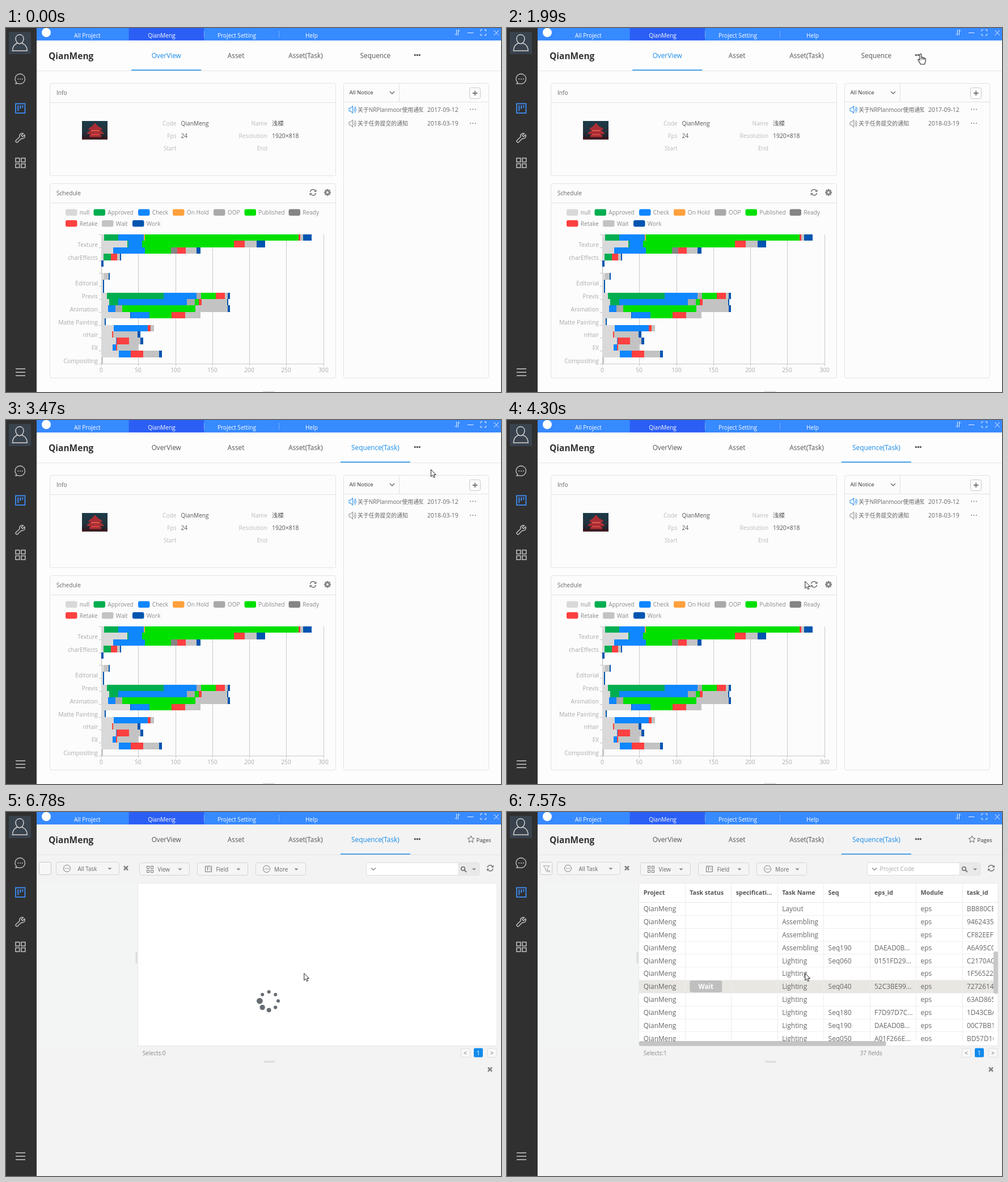
Recreate the animation shown at these times as an HTML page with a canvas. Size 873 by 642 pixels, loop 8000 ms.

```html
<!DOCTYPE html>
<html lang="en">
<head>
<meta charset="utf-8">
<title>Project overview</title>
<style>
html, body { margin: 0; width: 100%; height: 100%; overflow: hidden; background: #fdfdfd; }
canvas { display: block; }
</style>
</head>
<body>
<canvas id="stage" width="873" height="642"></canvas>
<script>
const g = document.getElementById('stage').getContext('2d');
const LOOP = 8000, TAU = Math.PI * 2;
const FONT = '"Open Sans", "Noto Sans CJK SC", "Noto Sans CJK", "Noto Sans", sans-serif';
const PROJECT = 'QianMeng', BLUE = '#188cea';

// ---- helpers ----
function text(s, x, y, color = '#555', size = 10.1, align = 'left', weight = 400) {
  g.font = `${weight} ${size}px ${FONT}`;
  g.textAlign = align;
  g.fillStyle = color;
  g.fillText(s, x, y + size * 0.36);
}
function rect(x, y, w, h, color) {
  g.fillStyle = color;
  g.fillRect(x, y, w, h);
}
function box(x, y, w, h, r, fill, stroke) {
  g.beginPath();
  g.roundRect(x, y, w, h, r);
  if (fill) { g.fillStyle = fill; g.fill(); }
  if (stroke) { g.strokeStyle = stroke; g.lineWidth = 1; g.stroke(); }
}
function dot(x, y, r, color) {
  g.fillStyle = color;
  g.beginPath();
  g.arc(x, y, r, 0, TAU);
  g.fill();
}
function dots(x, y, gap, r, color) {
  for (let i = -1; i < 2; i++) dot(x + i * gap, y, r, color);
}
function draw(d, color, width = 1, fill, x = 0, y = 0) {
  const p = new Path2D(d);
  g.save();
  g.translate(x, y);
  if (fill) { g.fillStyle = fill; g.fill(p); }
  if (color) { g.strokeStyle = color; g.lineWidth = width; g.stroke(p); }
  g.restore();
}
function ring(x, y, r, color, width = 1) {
  g.strokeStyle = color;
  g.lineWidth = width;
  g.beginPath();
  g.arc(x, y, r, 0, TAU);
  g.stroke();
}
function clipTo(x, y, w, h, paint) {
  g.save();
  g.beginPath();
  g.rect(x, y, w, h);
  g.clip();
  paint();
  g.restore();
}
const chevron = (x, y, color) => draw('M-4 -2L0 2L4 -2', color, 1.3, null, x, y);
const caret = (x, y) => draw('M-3.5 -1.5H3.5L0 2Z', null, 0, '#888', x, y);
const cross = (x, y) => draw('M-3.5 -3.5L3.5 3.5M3.5 -3.5L-3.5 3.5', '#858585', 2.6, null, x, y);
const refresh = (x, y) => {
  draw('M-5 -1A5 5 0 0 1 4 -3M5 1A5 5 0 0 1 -4 3', '#808080', 1.6, null, x, y);
  draw('M6 -5.5V-1H1.5ZM-6 5.5V1H-1.5Z', null, 0, '#808080', x, y);
};
function gear(x, y) {
  g.save();
  g.translate(x, y);
  for (let i = 0; i < 8; i++) {
    rect(-1.4, -6, 2.8, 4, '#858585');
    g.rotate(TAU / 8);
  }
  g.restore();
  ring(x, y, 3.3, '#858585', 2.6);
}

// ---- window frame ----
function sidebar() {
  rect(0, 0, 54, 642, '#303030');
  rect(5, 7, 39, 39, '#39434d');
  draw('M24 11.8C19.5 11.8 17 15 17 19C17 23.3 20 27.7 24 27.7C28 27.7 31 23.3 31 19C31 15 28.5 11.8 24 11.8Z' +
    'M20 26.8C14.5 28.8 11.5 33 11.5 40.3H37.3C37.3 33 33.5 28.8 28 26.8', '#d2d2d2', 1.5);
  const c = '#c4c4c4';
  draw('M18.7 96A8.7 8.7 0 1 1 22 98L17 98.3Z', c, 1.3);
  dots(25, 90, 3.8, 1, c);
  g.strokeStyle = '#3d8df2';
  g.lineWidth = 1.8;
  g.strokeRect(17, 133.5, 16.5, 16.5);
  for (const [x, h] of [[20.3, 10], [24.3, 6], [28.3, 4]]) rect(x, 136.5, 2, h, '#3d8df2');
  draw('M32.8 188.3L29.2 191.8L26.9 189.5L30.4 186C27 184.6 22.8 187.4 24 192L17.6 198.2C15.8 200.2 18.7 203 20.6 201.2L26.9 195C31.5 196.2 34.5 191.7 32.8 188.3Z', c, 1.4);
  g.strokeStyle = c;
  g.lineWidth = 1.5;
  for (const x of [17, 27]) for (const y of [229.5, 239.5]) g.strokeRect(x, y, 6.8, 6.8);
  for (const y of [600.5, 606.5, 612.5]) rect(17, y, 17, 1.4, '#d6d6d6');
}
function topBar() {
  rect(54, 0, 819, 22, '#378aff');
  rect(216.6, 0, 132.6, 21.6, '#2b5ef4');
  rect(349, 5, 1, 12, '#75acff');
  rect(481, 5, 1, 12, '#75acff');
  dot(71, 8, 8, '#fff');
  const c = '#fff';
  text('All Project', 143.5, 13, c, 10.1, 'center');
  text(PROJECT, 274.5, 13, c, 10.1, 'center');
  text('Project Setting', 407, 13, c, 10.1, 'center');
  text('Help', 539, 13, c, 10.1, 'center');
  draw('M794.5 3V13L791.5 10M797.5 13V3L800.5 6M814 8.5H824.5M837 6V3H840M843.5 3H846.5V6M846.5 10V13H843.5M840 13H837V10M860.5 4L869 13M869 4L860.5 13', '#e8f1ff');
}
function header(active, tabs) {
  text(PROJECT, 75, 49, '#333', 15.5, 'left', 700);
  tabs.forEach((s, i) => {
    const x = 282.7 + i * 122.9;
    text(s, x, 48.5, i === active ? BLUE : '#555', 11.8, 'center');
    if (i === active) rect(x - 61.5, 73.5, 123, 1.5, BLUE);
  });
  dots(725.3, 47.7, 4, 1.7, '#555');
}

// ---- overview page ----
const COLORS = {
  n: '#d9d9d9', a: '#00ae50', c: '#0f87ff', h: '#ffa03c', o: '#a9a9a9',
  p: '#00e000', d: '#848484', r: '#ff4040', w: '#c3c3c3', k: '#0055b0'
};
// each part: colour key and its right end
const BARS = [
  'n173 a198 c243 h245 p516 r519 w524 k539',
  'n214 a216 c240 p402 r421 w442 k457',
  'n189 c245 p291 d302 r317 w336 k343',
  'n172 a185 r196 w201 k203',
  'k172', '',
  'n173 w181 k183',
  'n171 k173', 'n171 k173',
  'n178 a278 c336 o344 p370 r386 w391 k395',
  'n182 a198 c319 o333 p340 r345 w390 k392',
  'n180 c193 o205 p334 w391 k395',
  'n219 k220 c253 p292 r316 w343',
  'n174 k176',
  'n190 c250 r255 w261',
  'n187 r189 w232 k237',
  'n194 c195 r217 w237 k242',
  'n188 c194 r196 w233',
  'n199 c220 r242 w270 k275',
  'w171'
];
const LEGEND = [
  ['n', 'null', 105, 0], ['a', 'Approved', 154.5, 0], ['c', 'Check', 233, 0], ['h', 'On Hold', 294, 0],
  ['o', 'OOP', 366, 0], ['p', 'Published', 420.5, 0], ['d', 'Ready', 498.5, 0],
  ['r', 'Retake', 105, 1], ['w', 'Wait', 169, 1], ['k', 'Work', 223, 1]
];
const GROUPS = ['Texture', 'charEffects', '', 'Editorial', 'Previs', 'Animation', 'Matte Painting', 'nHair', 'FX', 'Compositing'];

function chart() {
  for (const [key, name, x, row] of LEGEND) {
    const y = 325.5 + row * 19.5;
    box(x, y - 6, 20.5, 11.5, 3, COLORS[key]);
    text(name, x + 24.8, y, '#8a8a8a');
  }
  const top = 364, step = 11.4;
  for (let i = 0; i <= 6; i++) {
    const x = Math.round(168 + i * 65.25);
    rect(x, top, 1, 228, i ? '#c9c9c9' : '#b5b5b5');
    rect(x, 592, 1, 4, '#c9c9c9');
    text(i * 50, x, 603.5, '#aaa', 10.1, 'center');
  }
  rect(168, 592, 392, 1, '#c9c9c9');
  for (let i = 0; i <= 10; i++) rect(164, Math.round(top + i * step * 2), 4, 1, '#c0c0c0');
  GROUPS.forEach((s, i) => text(s, 162, 382 + i * step * 2, '#aaa', 10.3, 'right'));
  BARS.forEach((row, i) => {
    let x = 168;
    const y = Math.round(top + i * step), h = Math.round(top + (i + 1) * step) - y;
    for (const part of row.split(' ').filter(Boolean)) {
      const end = +part.slice(1);
      rect(x, y, end - x, h, COLORS[part[0]]);
      x = end;
    }
  });
}
function photo() {
  const sky = g.createLinearGradient(0, 164, 0, 196);
  sky.addColorStop(0, '#1c3b49');
  sky.addColorStop(0.6, '#24313c');
  sky.addColorStop(1, '#221a22');
  rect(134, 164, 45, 32.5, sky);
  draw('M146 177L152 173L157 167L162 173L169 177V180H146ZM143 185L148 181H167L172 185V187H143ZM147 188H168V193H147Z', null, 0, '#a92d34');
  rect(150, 180, 15, 2, '#e05a4c');
  rect(150, 187, 15, 2, '#d8473f');
  rect(134, 192.5, 45, 4, '#3a171e');
}
function speaker(y, color) {
  draw('M605 -2.5H607.5L611.5 -6V6L607.5 2.5H605ZM613.5 -3A4.5 4.5 0 0 1 613.5 3M614.8 -5.5A7.5 7.5 0 0 1 614.8 5.5', color, 1.1, null, 0, y);
}
function notice(y, title, date, color) {
  speaker(y, color);
  clipTo(618, y - 9, 118, 18, () => text(title, 620, y, '#666', 9.9));
  text(date, 743, y, '#666', 10.5);
  dots(823.5, y - 0.5, 4.3, 0.9, '#777');
}
function overview(active) {
  rect(54, 22, 819, 620, '#fdfdfd');
  rect(54, 75, 819, 1, '#e6e6e6');
  header(active, ['OverView', 'Asset', 'Asset(Task)', active ? 'Sequence(Task)' : 'Sequence']);
  const line = '#e2e2e2';
  box(77.5, 97.5, 504, 163, 3, '#fcfcfc', line);
  rect(78, 131, 503, 1, line);
  text('Info', 89, 114.5, '#666');
  photo();
  const info = [['Code', PROJECT, 'Name', '浅檬'], ['Fps', '24', 'Resolution', '1920×818'], ['Start', '', 'End', '']];
  info.forEach((r, i) => {
    const y = 168.5 + i * 22;
    text(r[0], 300.5, y, '#bbb', 10.2, 'right');
    text(r[1], 308.5, y, '#555', 10.2);
    text(r[2], 461, y, '#bbb', 10.2, 'right');
    text(r[3], 469, y, '#555', 10.4);
  });
  box(77.5, 274.5, 504, 343, 3, '#fcfcfc', line);
  rect(78, 308, 503, 1, line);
  text('Schedule', 89, 291.5, '#666');
  refresh(541.5, 290);
  gear(567, 290);
  chart();
  box(595.5, 97.5, 256, 520, 3, '#fcfcfc', line);
  rect(596, 130, 255, 1, line);
  rect(693, 98, 1, 32, line);
  text('All Notice', 605.5, 114, '#333', 9.6);
  chevron(681, 114, '#666');
  box(817.5, 105.5, 19, 19, 3, '#fcfcfc', '#c8c8c8');
  draw('M823 115H831.5M827.2 110.8V119.2', '#777', 1.8);
  notice(144, '关于NRPlanmoor使用通知', '2017-09-12', '#3a98ee');
  notice(168.5, '关于任务提交的通知', '2018-03-19', '#999');
  box(453, 640.5, 21, 4, 1, '#dedede');
}

// ---- drop-down ----
const MENU = ['Sequence(Task)', 'Shot', 'Shot(Task)', 'Version', 'poseLibrary', 'Online File'];
function menu(alpha, hover) {
  g.save();
  g.globalAlpha = alpha;
  g.shadowColor = 'rgba(0,0,0,.3)';
  g.shadowBlur = 4;
  g.shadowOffsetY = 1;
  box(705.5, 77, 87.5, 136.5, 2, '#f6f6f6');
  g.shadowColor = 'transparent';
  box(705.5, 77.5, 87, 136, 2, null, '#d8d8d8');
  if (hover) rect(706, 78, 86, 21, '#e6e4df');
  MENU.forEach((s, i) => text(s, 711.5, 88 + i * 22.8, '#999'));
  g.restore();
}

// ---- task page ----
function button(x, w, y, label, labelX) {
  box(x + 0.5, y + 0.5, w, 22, 3, '#f5f5f5', '#d5d5d5');
  text(label, labelX, y + 12.5, '#666', 9.9);
  caret(x + w - 16, y + 12);
}
function ringDots(x, y) {
  ring(x, y, 6, '#777');
  dots(x, y, 2.7, 0.8, '#777');
}
function taskPage(ready) {
  rect(54, 22, 819, 620, '#f3f3f3');
  rect(54, 75, 819, 1, '#e4e4e4');
  header(3, ['OverView', 'Asset', 'Asset(Task)', 'Sequence(Task)']);
  draw('M0 -6L1.8 -2L6 -1.6L2.8 1.2L3.8 5.5L0 3.2L-3.8 5.5L-2.8 1.2L-6 -1.6L-1.8 -2Z', '#666', 1, null, 820, 48);
  text('Pages', 829.5, 49.5, '#333', 9.5);

  box(58.5, 88.5, 21, 22, 2, '#f7f7f7', '#c6c6c6');
  if (ready) draw('M64 95H75L71 100V105L68 103V100ZM72 103.5H76M72 105.5H76', '#999', 1);
  button(88, 111, 88, 'All Task', 126.5);
  ringDots(107.5, 99.5);
  cross(211.5, 99);
  button(235, 88, 89, 'View', 267.5);
  g.strokeStyle = '#777';
  g.lineWidth = 1;
  for (const x of [248.5, 255.5]) for (const y of [95.5, 102.5]) g.strokeRect(x, y, 4, 4);
  button(337, 89, 89, 'Field', 370.5);
  draw('M351.5 95.5H362.5V105.5H351.5ZM353.5 98H357.5M355.5 98V103.5M359 99H361M359 102H361', '#777');
  button(440, 88, 89, 'More', 473);
  ringDots(459.5, 100.5);
  box(635.5, 89.5, 199, 22, 3, '#e9e9e9', '#e0e0e0');
  box(635.5, 89.5, 163, 22, [3, 0, 0, 3], '#fff', '#dedede');
  chevron(648, 100.5, '#888');
  if (ready) text('Project Code', 657.5, 100.5, '#aaa', 10.3);
  ring(806, 100, 3.2, '#777', 1.8);
  draw('M808.5 102.5L812 106', '#777', 2);
  caret(825.5, 101);
  refresh(854, 99);

  rect(54, 125, 178, 287, '#f3f5f4');
  rect(228.5, 247, 3, 20, '#dcdcdc');
  box(232.5, 125.5, 633.5, 287, 0, '#fff', '#e6e6e6');
  rect(455, 439, 19, 1, '#cfcfcf');
  rect(455, 441, 19, 1, '#cfcfcf');
  box(802.5, 417, 15.5, 15.5, 2, '#f8f8f8', '#dcdcdc');
  box(825, 416.5, 16, 16, 2, '#118aec');
  box(849.5, 417, 15.5, 15.5, 2, '#f8f8f8', '#dcdcdc');
  text('<', 810, 425, '#666', 10.1, 'center');
  text('1', 833, 425, '#fff', 10.1, 'center');
  text('>', 857, 425, '#666', 10.1, 'center');
  cross(853.5, 454);
}
function spinner(t) {
  const head = Math.round((t - 7190) / 125) - 1;
  for (let i = 0; i < 8; i++) {
    const lag = (((head - i) % 8) + 8) % 8, a = i * TAU / 8;
    dot(463.7 + 16.3 * Math.cos(a), 333.3 + 16 * Math.sin(a), Math.max(3, 5.4 - lag * 0.75), '#666c73');
  }
}
const HEADS = ['Project', 'Task status', 'specificati...', 'Task Name', 'Seq', 'eps_id', 'Module', 'task_id'];
const ROWS = [
  'Layout|||BB880CE4', 'Assembling|||9462435A', 'Assembling|||CF82EEF1', 'Assembling|Seq190|DAEAD0B...|A6A95C07',
  'Lighting|Seq060|0151FD29...|C2170A0B', 'Lighting|||1F565228', 'Lighting|Seq040|52C3BE99...|72726140',
  'Lighting|||63AD865C', 'Lighting|Seq180|F7D97D7C...|1D43CBA2', 'Lighting|Seq190|DAEAD0B...|00C7BB1E',
  'Lighting|Seq050|A01F266E...|BD57D16F'
];
function table(rows, selected) {
  const colX = i => 240.8 + i * 81.45;
  if (rows) clipTo(233, 159, 625, 245, () => {
    ROWS.forEach((row, i) => {
      const y = 171 + i * 22.83;
      const [task, seq, eps, id] = row.split('|');
      if (selected && i === 6) rect(233, y - 11, 625, 23, '#e9e7e2');
      rect(233, Math.round(y + 11), 625, 1, '#f0f0f0');
      [[0, PROJECT], [3, task], [4, seq], [5, eps], [6, 'eps'], [7, id]]
        .forEach(([c, s]) => text(s, colX(c), y, '#666', 11.9));
    });
    box(322.3, 297.3, 57, 20.7, 3, '#bfbfbf');
    text('Wait', 350.7, 308, '#fff', 11.6, 'center', 700);
  });
  clipTo(233, 126, 633, 278, () => {
    HEADS.forEach((s, i) => {
      text(s, colX(i), 142, '#555', 10.7, 'left', 700);
      if (i) rect(Math.round(colX(i) - 8.3), 126, 1, rows ? 278 : 33, '#ececec');
    });
    rect(233, 159, 633, 1, '#e8e8e8');
  });
  if (!rows) return;
  box(858, 246, 8, 74.5, 3, '#c8c8c8');
  box(233, 404, 435.5, 8.5, 3, '#c4c4c4');
}

// ---- pointer ----
const MOVES = [
  [520, 1290, [[772, 619], [697, 555], [676, 482], [655, 367], [641, 232], [637, 179], [643, 130], [652, 93], [662, 70], [672, 55], [686, 43]]],
  [1370, 1760, [[699, 39], [711, 36], [719, 37], [725, 39], [729, 41], [732, 42]]],
  [1990, 1990, [[729.5, 45.5]]],
  [2600, 2850, [[734, 53], [741, 68], [747, 82], [749, 87]]],
  [4100, 4300, [[712, 124], [620, 210], [547, 269], [525.3, 284]]]
];
function pointer(t) {
  let at = null;
  for (const [from, to, pts] of MOVES) {
    if (t < from) break;
    const gap = (to - from) / Math.max(1, pts.length - 1);
    at = pts[gap ? Math.min(pts.length - 1, Math.floor((t - from) / gap + 0.06)) : 0];
  }
  if (!at) return;
  const [x, y] = at;
  if (t < 3470 && y < 90) {
    draw('M-1.5 11V1.5C-1.5 -.2 1.5 -.2 1.5 1.5V6.5C2.2 5.6 4 5.8 4.2 7.2C5 6.4 6.4 6.7 6.6 8C7.5 7.3 8.7 8 8.7 9.2V13C8.7 15 7.2 16 7 18.5H-.2C-.4 16.5 -3 14 -4.3 11.5C-5.2 9.6 -3.2 8.6 -1.5 11ZM1.5 6.5V10M4.2 7.2V10.3M6.6 8V10.5', '#222', 1.1, '#fff', x, y);
  } else {
    draw('M.5 .5V13L3.4 10.3L5.3 14.6L7.4 13.7L5.5 9.5H9.3Z', '#222', 1, '#fff', x, y);
  }
}

function frame(now) {
  const t = now % LOOP;
  if (t < 6410) {
    overview(t < 3470 ? 0 : 3);
    if (t >= 2070 && t < 3470) menu(t < 2145 ? 0.45 : t < 2220 ? 0.8 : 1, t >= 2760);
  } else if (t < 6490) {
    rect(54, 22, 819, 620, '#f7f7f7');
  } else {
    taskPage(t >= 7260);
    if (t >= 7340) table(t >= 7410, t >= 7490);
    else if (t >= 6570) spinner(t);
    text(t < 7490 ? 'Selects:0' : 'Selects:1', 240.8, 425, '#888');
    if (t >= 7410) text('37 fields', 622.5, 425, '#888');
  }
  sidebar();
  topBar();
  pointer(t);
  requestAnimationFrame(frame);
}
requestAnimationFrame(frame);
</script>
</body>
</html>
```
